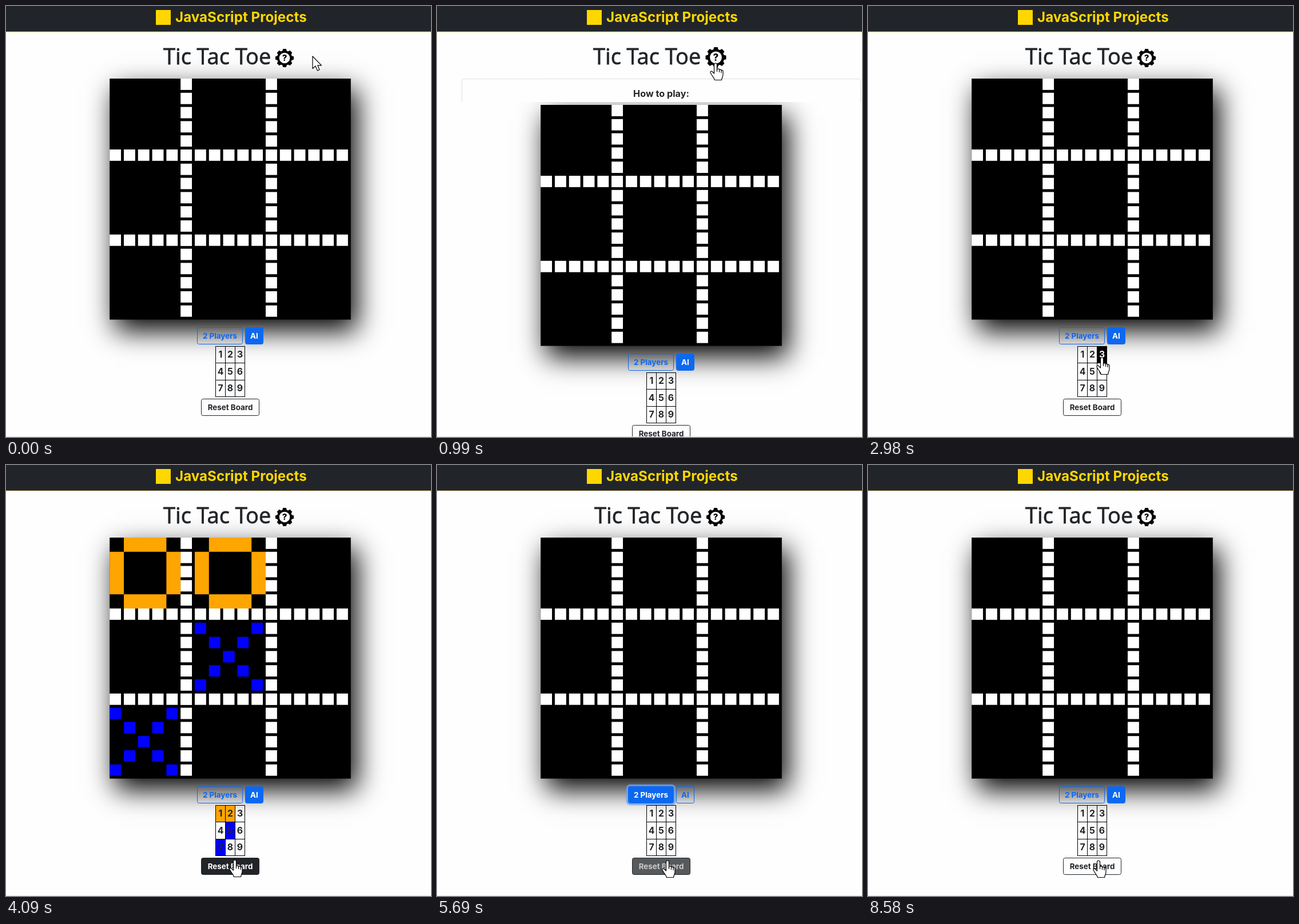
These frames come from a looping animation (743 px wide and 754 px high, 8610 ms). An HTML page with a canvas:

```html
<!DOCTYPE html>
<html lang="en">
<head>
<meta charset="utf-8">
<title>Tic Tac Toe</title>
<style>
html, body { margin: 0; width: 100%; height: 100%; overflow: hidden; background: #fefefe; }
canvas { display: block; }
</style>
</head>
<body>
<canvas id="stage" width="743" height="754"></canvas>
<script>
const ctx = document.getElementById('stage').getContext('2d');
const LOOP = 8610;
const DARK = '#212529', BLUE = [13, 104, 240], WHITE = [255, 255, 255], INK = [33, 37, 41];
const BOARD = { x: 181.2, y: 127, size: 421.6, unit: 24.8, dot: 19.84 };
const SANS = 'Inter, "Open Sans", sans-serif';

// Board contents from each time on, cells 1-9 left to right
const MOVES = [
  [0, ''], [1790, 'O....X'], [2040, 'OO..XX'], [2290, 'OOO.XX'], [2790, ''],
  [3860, 'O.....X'], [4090, 'OO..X.X'], [4220, 'OOO.X.X'], [4480, ''],
  [5700, 'O'], [6020, 'OX'], [6370, 'OXO'], [6740, 'OXOX'],
  [6980, 'OXOXO'], [7250, 'OXOXOX'], [7550, 'OXOXOXO'], [8520, '']
];

// Pointer: time, x, y
const POINTER = [
  [0, 536, 88], [70, 536, 88], [190, 487, 100], [1060, 487, 100],
  [1620, 375, 599], [1710, 375, 604], [1790, 375, 604], [2030, 392, 607],
  [2290, 410, 612], [2790, 410, 612], [2980, 409, 615], [3270, 409, 615],
  [3500, 400, 691], [4480, 400, 691], [4730, 398, 684], [5060, 398, 684],
  [5090, 399, 680], [5340, 374, 577], [5430, 374, 577], [5690, 403, 692], [LOOP, 403, 692]
];

const HAND = new Path2D('M-2.5 2.5a2.5 2.5 0 0 1 5 0V11a2.1 2.1 0 0 1 4 .8a2 2 0 0 1 3.6 1a1.7 1.7 0 0 1 2.9 1.6V20' +
  'c0 4-2 5-2.5 9.5H-1.5c-1-4-3.5-6-5.5-9.5l-2-3.5c-.8-2 1.5-3.3 3.2-1.7L-2.5 18z');
const KNUCKLES = new Path2D('M2.5 11v4M6.5 12v4M10.1 13v4');
const ARROW = new Path2D('M0 0V21.5L5 17L8.5 25L12 23.5L8.8 15.8H15.5Z');

const clamp = v => Math.min(1, Math.max(0, v));
const ramp = (t, a, b) => clamp((t - a) / (b - a));
const smooth = u => u * u * (3 - 2 * u);
const rgb = c => `rgb(${c.join(',')})`;
const mix = (a, b, k) => rgb(a.map((v, i) => Math.round(v + (b[i] - v) * k)));

// CSS "ease": cubic-bezier(.25, .1, .25, 1)
function ease(x) {
  let lo = 0, hi = 1, s = x;
  for (let i = 0; i < 18; i++) {
    s = (lo + hi) / 2;
    const px = 0.75 * s * (1 - s) + s ** 3;
    if (px < x) lo = s; else hi = s;
  }
  return 0.3 * s * (1 - s) ** 2 + 3 * s * s * (1 - s) + s ** 3;
}

function pointerAt(t) {
  const i = POINTER.findIndex(p => p[0] > t);
  const [t0, x0, y0] = POINTER[i - 1], [t1, x1, y1] = POINTER[i];
  const k = smooth(ramp(t, t0, t1));
  return { x: x0 + (x1 - x0) * k, y: y0 + (y1 - y0) * k };
}

function boardAt(t) {
  return MOVES.filter(m => m[0] <= t).pop()[1];
}

function rect(x, y, w, h, color) {
  ctx.fillStyle = color;
  ctx.fillRect(x, y, w, h);
}

function text(str, x, y, font, color, align = 'left') {
  ctx.font = font;
  ctx.fillStyle = color;
  ctx.textAlign = align;
  ctx.fillText(str, x, y);
}

function header() {
  rect(0, 0, 743, 44, DARK);
  rect(0, 44, 743, 1, '#5a5338');
  rect(0, 45, 743, 1, '#fce9b5');
  rect(0, 46, 743, 1, '#fef8e8');
  rect(262, 7, 26, 26, '#ffd700');
  text('JavaScript Projects', 296, 28, `700 24.2px ${SANS}`, '#ffd700');
}

function gear(x, y, r) {
  ctx.save();
  ctx.translate(x, y);
  ctx.scale(r / 16, r / 16);
  ctx.fillStyle = '#000';
  for (let i = 0; i < 8; i++) {
    ctx.rotate(Math.PI / 4);
    ctx.beginPath();
    ctx.moveTo(-4.2, -11);
    ctx.lineTo(-2.8, -16);
    ctx.lineTo(2.8, -16);
    ctx.lineTo(4.2, -11);
    ctx.fill();
  }
  ctx.beginPath();
  ctx.arc(0, 0, 13, 0, 7);
  ctx.fill();
  ctx.beginPath();
  ctx.arc(0, 0, 9.3, 0, 7);
  ctx.fillStyle = '#fefefe';
  ctx.fill();
  text('?', 0, 5.4, `800 15px ${SANS}`, '#000', 'center');
  ctx.restore();
}

function title(t) {
  const grow = ramp(t, 130, 200) - ramp(t, 1090, 1160);
  const x = 275 - 2 * grow;
  text('Tic Tac Toe', x, 102, '500 38px "Open Sans", "Noto Sans", sans-serif', DARK);
  ctx.strokeStyle = DARK;
  ctx.lineWidth = 0.8;
  ctx.strokeText('Tic Tac Toe', x, 102);
  gear(487 + 0.5 * grow, 91 - grow, 16 + 2 * grow);
}

function underlined(str, x, y) {
  text(str, x, y, `italic 700 16.2px ${SANS}`, DARK);
  rect(x, y + 2, ctx.measureText(str).width, 1, DARK);
}

function help(height) {
  const font = `700 16.2px ${SANS}`;
  ctx.save();
  ctx.beginPath();
  ctx.rect(43, 127, 699, height);
  ctx.clip();
  rect(43, 127, 699, 103, '#fefefe');
  ctx.beginPath();
  ctx.roundRect(43.5, 127.5, 697, 102, 4);
  ctx.strokeStyle = '#dfdfdf';
  ctx.lineWidth = 1;
  ctx.stroke();
  text('How to play:', 392, 159, font, DARK, 'center');
  text('Method 1: Press', 59, 182, font, DARK);
  underlined("numbers '1-9' on the keyboard", 187, 182);
  text('as shown in the sample board below', 432, 182, font, DARK);
  text('Method 2: Press on the', 59, 205, font, DARK);
  underlined('numbered grids', 247, 205);
  text('on the sample board below', 379, 205, font, DARK);
  ctx.restore();
}

function mark(kind, col, row) {
  const { x, y, unit: u, dot } = BOARD;
  const cx = x + col * 6 * u, cy = y + row * 6 * u;
  if (kind === 'O') {
    for (const d of [0, 4]) {
      rect(cx + u, cy + d * u, 3 * u, u, 'orange');
      rect(cx + d * u, cy + u, u, 3 * u, 'orange');
    }
  } else if (kind === 'X') {
    for (let i = 0; i < 5; i++) {
      rect(cx + i * u, cy + i * u, dot, dot, '#00f');
      rect(cx + i * u, cy + (4 - i) * u, dot, dot, '#00f');
    }
  }
}

function board(cells) {
  const { x, y, size, unit, dot } = BOARD;
  ctx.save();
  ctx.shadowColor = '#000';
  ctx.shadowBlur = 45;
  ctx.shadowOffsetX = 10;
  ctx.shadowOffsetY = 19;
  rect(x, y, size, size, '#000');
  ctx.restore();
  [...cells].forEach((kind, i) => mark(kind, i % 3, Math.floor(i / 3)));
  for (const line of [5, 11]) {
    for (let i = 0; i < 17; i++) {
      rect(x + line * unit, y + i * unit, dot, dot, '#fff');
      rect(x + i * unit, y + line * unit, dot, dot, '#fff');
    }
  }
  const won = [[0, 1, 2], [2, 4, 6]].some(w => w.every(i => cells[i] === 'O'));
  if (won) text('O Wins!', 392, 340, '110px "Liberation Sans", Arial, sans-serif', '#fff', 'center');
}

function button(label, x, y, w, h, color, fill) {
  ctx.beginPath();
  ctx.roundRect(x + 0.5, y + 0.5, w - 1, h - 1, 3);
  ctx.globalAlpha = fill;
  ctx.fillStyle = rgb(color);
  ctx.fill();
  ctx.globalAlpha = 1;
  ctx.lineWidth = 1;
  ctx.strokeStyle = rgb(color);
  ctx.stroke();
  text(label, x + w / 2, y + h / 2 + 4.5, `700 13.4px ${SANS}`, mix(color, WHITE, fill), 'center');
}

function controls(t) {
  const duo = ramp(t, 5370, 5470) - ramp(t, 8520, 8580);
  const passing = ramp(t, 1480, 1560) - ramp(t, 1560, 1660);
  const hover = ramp(t, 5280, 5380) - ramp(t, 8520, 8580);
  const reset = ramp(t, 3400, 3500) - ramp(t, 4480, 4600) + ramp(t, 5600, 5720) - ramp(t, 8520, 8580);
  if (duo > 0) {
    ctx.beginPath();
    ctx.roundRect(332.5, 560.5, 83, 33, 5);
    ctx.lineWidth = 3.5;
    ctx.strokeStyle = `rgba(110,165,250,${0.75 * duo})`;
    ctx.stroke();
  }
  button('2 Players', 334, 562, 80, 30, BLUE, Math.max(passing, hover, duo));
  button('AI', 418, 562, 32, 30, BLUE, 1 - duo);
  button('Reset Board', 341, 687, 102, 30, INK, reset);
}

function keypad(cells, p) {
  const xs = [366, 383, 400, 417], ys = [595, 624, 654, 683];
  for (let i = 0; i < 9; i++) {
    const c = i % 3, r = Math.floor(i / 3);
    const x = xs[c], y = ys[r], w = xs[c + 1] - x, h = ys[r + 1] - y;
    const over = p.y < 678 && p.x >= x && p.x < x + w && p.y >= y && p.y < y + h;
    const fill = { O: 'orange', X: '#00f' }[cells[i]] || (over ? '#000' : null);
    if (fill) rect(x, y, w, h, fill);
    text(i + 1, x + w / 2 + 0.5, y + h / 2 + 5.5, `700 15.8px ${SANS}`, fill === '#000' ? '#fff' : DARK, 'center');
  }
  for (const x of xs) rect(x, 595, 1, 89, '#000');
  for (const y of ys) rect(366, y, 52, 1, '#000');
}

function pointer({ x, y }) {
  const clickable = Math.hypot(x - 487, y - 91) < 20 || (y > 562 && x > 334 && x < 450);
  ctx.save();
  ctx.translate(x, y);
  ctx.fillStyle = '#fff';
  ctx.strokeStyle = '#000';
  ctx.lineWidth = 1.2;
  ctx.lineJoin = 'round';
  const shape = clickable ? HAND : ARROW;
  ctx.fill(shape);
  ctx.stroke(shape);
  if (clickable) ctx.stroke(KNUCKLES);
  ctx.restore();
}

function draw(t) {
  const cells = boardAt(t), p = pointerAt(t);
  const open = ease(ramp(t, 182, 532)) - ease(ramp(t, 870, 1220));
  const height = Math.round(103 * open);
  const shift = height > 0 ? height + 5 : 0;

  rect(0, 0, 743, 754, '#fefefe');
  ctx.save();
  ctx.translate(0, shift);
  board(cells);
  controls(t);
  keypad(cells, p);
  ctx.restore();
  if (height > 0) help(height);
  header();
  title(t);
  rect(0, 753, 743, 1, '#e9e9e9');
  pointer(p);
}

const start = performance.now();
function tick() {
  draw((performance.now() - start) % LOOP);
  requestAnimationFrame(tick);
}
tick();
</script>
</body>
</html>
```
